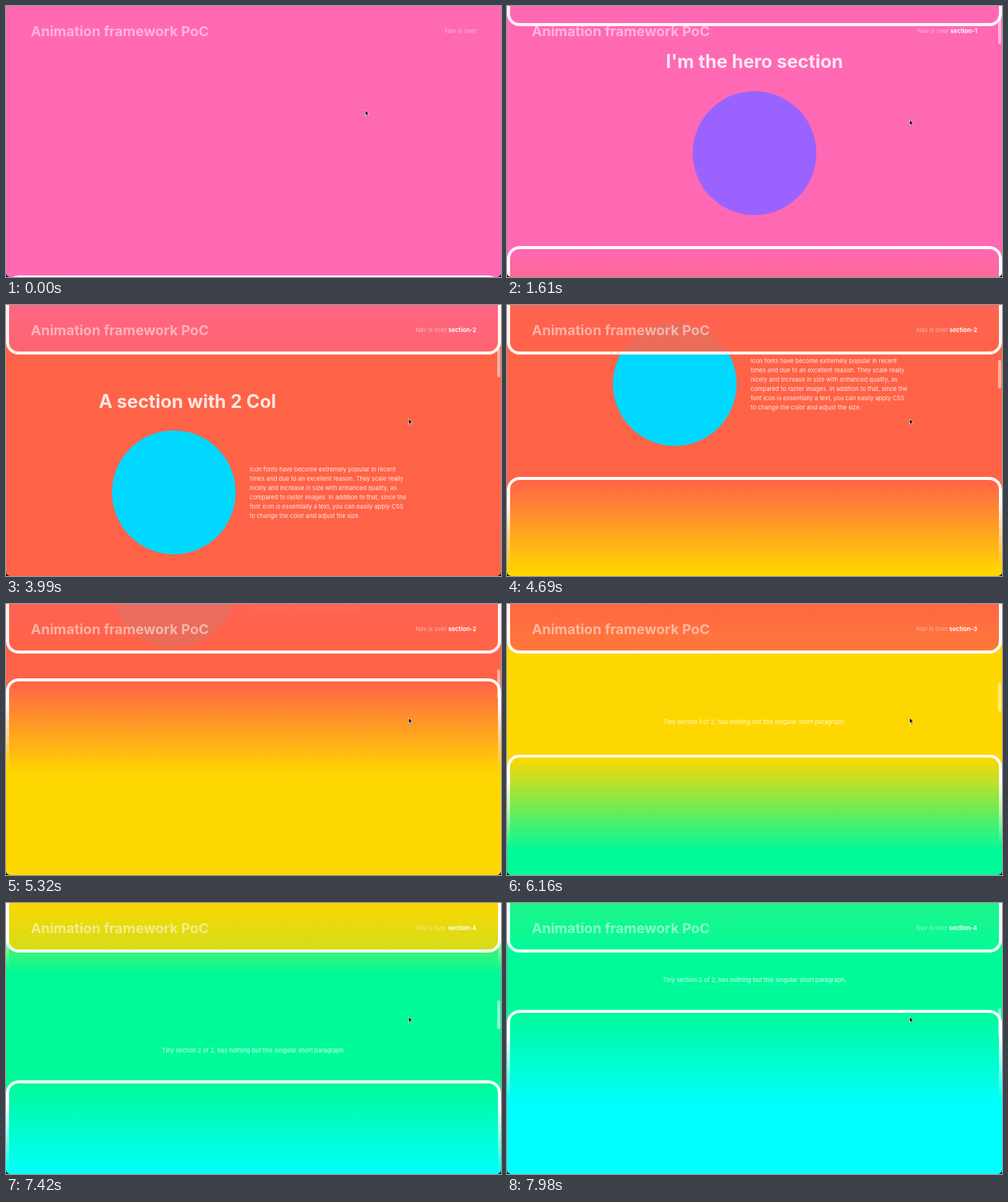
Animation of 640 by 350 pixels, one loop 8000 ms. Source, as an HTML page:

```html
<!DOCTYPE html>
<html lang="en">
<head>
<meta charset="utf-8">
<title>Animation framework PoC</title>
<style>
html, body { margin: 0; width: 100%; height: 100%; overflow: hidden; }
body { font: 7.7px/12px Inter, sans-serif; font-optical-sizing: none; color: rgba(255, 255, 255, .85); }
#stage { position: relative; width: 640px; height: 350px; overflow: hidden; background: #ff69b4; }
#page, .item, section, #nav, .title, #label, #thumb, #cursor, #corners { position: absolute; }
#page { left: 0; top: 0; width: 640px; }
section {
  left: 0; width: 640px; border-radius: 16px 16px 0 0;
  background: linear-gradient(var(--from) 4px, var(--color) 124px);
}
section::before {
  content: ""; position: absolute; left: 0; top: 0; box-sizing: border-box;
  width: 100%; height: 118px; border: 4px solid #fff; border-bottom: 0;
  border-radius: 16px 16px 0 0; opacity: .96;
  -webkit-mask: linear-gradient(#000 35px, transparent); mask: linear-gradient(#000 35px, transparent);
}
section:first-child { border-radius: 0; }
section:first-child::before { display: none; }
.item { white-space: pre; transform: translateY(-50%); }
.center { left: 0; width: 640px; text-align: center; }
h2 { margin: 0; font-size: 23.7px; line-height: 30px; font-weight: 700; }
.disc { width: 160px; height: 160px; border-radius: 50%; }
#nav {
  left: 0; top: 0; width: 640px; height: 64px; box-sizing: border-box; opacity: .92;
  border: 4px solid #fff; border-top: 0; border-radius: 0 0 16px 16px;
  background-origin: border-box;
}
.title { left: 32px; top: 21px; font-size: 18px; line-height: 24px; font-weight: 700; color: rgba(255, 255, 255, .5); }
#label { right: 32px; top: 26.5px; white-space: pre; color: rgba(255, 255, 255, .5); }
#label b { color: rgba(255, 255, 255, .95); }
#thumb { right: 1px; top: 0; width: 4px; height: 37px; border-radius: 2px; background: rgba(255, 255, 255, .5); }
#cursor { left: 0; top: 0; }
#corners { inset: 0; border-radius: 0 0 5px 5px; box-shadow: 0 0 0 6px #000; }
</style>
</head>
<body>
<div id="stage">
  <div id="page"></div>
  <div id="nav"></div>
  <div class="title">Animation framework PoC</div>
  <div id="label">Nav is over<b></b></div>
  <div id="thumb"></div>
  <svg id="cursor" width="8" height="11" viewBox="-1 -1 8 11">
    <path d="M0 0V7L1.7 5.5 2.9 8.2 4.1 7.7 2.9 5.1H5Z" fill="#000" stroke="#fff" stroke-width=".6"/>
  </svg>
  <div id="corners"></div>
</div>
<script>
const LOOP = 8000, STEP = 70;
const $ = id => document.getElementById(id);
const clamp = (v, lo = 0, hi = 1) => Math.min(hi, Math.max(lo, v));
const smooth = v => { v = clamp(v); return v * v * (3 - 2 * v); };

const sections = [
  { top: 0, color: '#ff69b4' },
  { top: 348, color: '#ff6347' },
  { top: 817, color: '#ffd700' },
  { top: 1079, color: '#00fa9a' },
  { top: 1341, color: '#00ffff' }
];
const scrollKeys = [[0, 0], [1370, 0], [1470, 10], [1610, 38], [2520, 222], [3990, 455],
  [5320, 721], [6860, 1021], [7980, 1203]];

const fontText = `Icon fonts have become extremely popular in recent
times and due to an excellent reason. They scale really
nicely and increase in size with enhanced quality, as
compared to raster images. In addition to that, since the
font icon is essentially a text, you can easily apply CSS
to change the color and adjust the size.`;

// y is the vertical centre on the page
const items = [
  { y: 110, html: "<h2>I'm the hero section</h2>", cls: 'center' },
  { y: 228, cls: 'disc', css: 'left:240px;background:#9a63ff' },
  { y: 580, html: '<h2>A section with 2 Col</h2>', css: 'left:120px' },
  { y: 697, cls: 'disc', css: 'left:137px;background:#00d8ff' },
  { y: 698, html: fontText, css: 'left:315px' },
  { y: 1038, html: 'Tiny section 1 of 2, has nothing but this singular short paragraph.', cls: 'center' },
  { y: 1303, html: 'Tiny section 2 of 2, has nothing but this singular short paragraph.', cls: 'center' }
];

sections.forEach((s, i) => {
  const el = document.createElement('section');
  const end = sections[i + 1] ? sections[i + 1].top + 20 : s.top + 500;
  el.style.cssText = `top:${s.top}px;height:${end - s.top}px;--color:${s.color};--from:${sections[Math.max(0, i - 1)].color}`;
  $('page').append(el);
});
for (const item of items) {
  item.el = document.createElement('div');
  item.el.className = 'item ' + (item.cls || '');
  item.el.style.cssText = `top:${item.y}px;${item.css || ''}`;
  item.el.innerHTML = item.html || '';
  $('page').append(item.el);
}

function scrollAt(t) {
  const i = Math.max(1, scrollKeys.findIndex(k => k[0] >= t));
  const [t0, s0] = scrollKeys[i - 1], [t1, s1] = scrollKeys[i];
  return s0 + (s1 - s0) * (t - t0) / (t1 - t0);
}

function navColor(scroll, shift) {
  let i = sections.length - 1;
  while (i > 0 && sections[i].top > scroll) i--;
  const mix = i ? clamp(smooth((scroll - sections[i].top - 90) / 34) + shift) : 1;
  return `color-mix(in srgb, ${sections[Math.max(0, i - 1)].color}, ${sections[i].color} ${mix * 100}%)`;
}

function draw(t) {
  const scroll = scrollAt(t);
  $('page').style.transform = `translateY(${-scroll}px)`;
  for (const { el, y } of items) {
    el.style.opacity = y < 348 ? smooth((t - 200) / 700) : smooth((280 - y + scroll) / 35);
  }

  const drop = clamp(scroll - 12, 0, 64);
  $('nav').style.transform = `translateY(${drop - 64}px)`;
  $('nav').style.visibility = drop ? 'visible' : 'hidden';
  $('nav').style.backgroundImage = `linear-gradient(${navColor(scroll, -.12)}, ${navColor(scroll, .12)})`;

  const over = sections.filter(s => s.top <= scroll + 32).length;
  $('label').lastChild.textContent = scroll > 5 ? ` section-${over}` : '';

  $('thumb').style.transform = `translateY(${8 + scroll * .106}px)`;
  $('thumb').style.opacity = clamp(scroll / 10);

  const move = smooth((t - 350) / 650);
  $('cursor').style.transform = `translate(${463.5 + 56 * move}px, ${133.5 + 12.5 * move}px)`;
}

const start = performance.now();
function tick() {
  const t = (performance.now() - start) % LOOP;
  draw(Math.floor(t / STEP) * STEP);
  requestAnimationFrame(tick);
}
tick();
</script>
</body>
</html>
```
